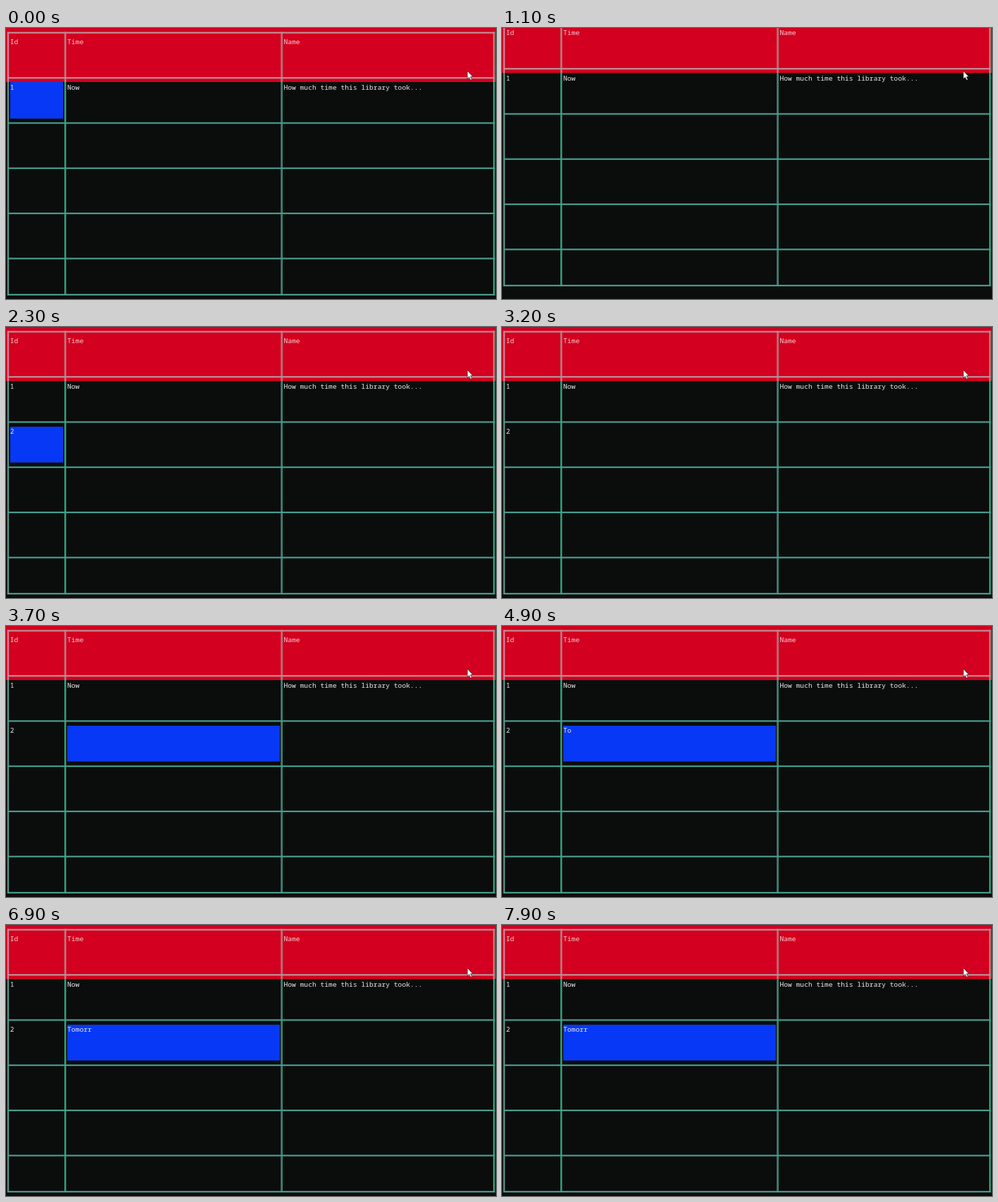
These frames come from a looping animation (696 px wide and 386 px high, 8 s). An HTML page:

```html
<!DOCTYPE html>
<html lang="en">
<head>
<meta charset="utf-8">
<title>Terminal table</title>
<style>
  html, body { margin: 0; width: 100%; height: 100%; overflow: hidden; background: #0b0d0c; }
  svg { display: block; }
  text { font: 500 9.667px "Noto Sans Mono", "DejaVu Sans Mono", monospace; white-space: pre; fill: #ececea; }
  .head { fill: #f8ccd4; }
</style>
</head>
<body>
<svg id="stage" width="696" height="386" viewBox="0 0 696 386">
  <g id="screen"></g>
  <path d="M655.3 61 V72.6 L657.9 70.2 L659.8 74.3 L661.6 73.5 L659.8 69.5 H663 Z"
        fill="#fff" stroke="#111" stroke-width=".6"/>
</svg>
<script>
// Terminal of 120 x 30 character cells.
const CW = 696 / 120, CH = 386 / 30, LOOP = 8000;
const ROWS = [0, 5, 10, 15, 20, 25, 29];
const screen = document.getElementById('screen');

function add(tag, attrs, content = '') {
  const el = document.createElementNS('http://www.w3.org/2000/svg', tag);
  for (const key in attrs) el.setAttribute(key, attrs[key]);
  el.textContent = content;
  return screen.appendChild(el);
}
const rect = (x, y, width, height, fill) => add('rect', { x, y, width, height, fill });
const label = (col, row, content, cls = '') =>
  add('text', { x: col * CW, y: row * CH + 10.3, class: cls }, content);

const px = col => Math.round(col * CW);
const py = row => Math.round(row * CH);
const midX = col => (col + .5) * CW + .1;
const midY = row => (row + .5) * CH + .3;
const headEnd = py(6);

rect(0, 0, 696, headEnd, '#d30020');
const mark = rect(0, 0, 0, 0, '#0738f6');

// Thin, slightly soft rules; the colour changes below the header.
function hRule(row) {
  const x = midX(0) - 1.1;
  rect(x, midY(row) - 1.1, midX(119) + 1.1 - x, 2.2, row < 6 ? '#c08c95' : '#489d8f');
}
function vRule(col, headColors, bodyColors) {
  const top = midY(0) - 1.1, end = midY(29) + 1.1;
  const pair = (y, h, colors) =>
    colors.forEach((c, i) => rect(midX(col) - 1.2 + i * 1.2, y, 1.2, h, c));
  pair(top, headEnd - top, headColors);
  pair(headEnd, end - headEnd, bodyColors);
}
vRule(0, ['#e673a6', '#c4808c'], ['#6b7fbe', '#5d8f78']);
vRule(14, ['#a28f88', '#b4968f'], ['#30b488', '#45a992']);
vRule(67, ['#b48e92', '#a8938c'], ['#5a9fa4', '#3fa78a']);
vRule(119, ['#bb8d8c', '#96998a'], ['#4ba58c', '#2cba90']);
ROWS.forEach(hRule);

label(1, 1, 'Id', 'head');
label(15, 1, 'Time', 'head');
label(68, 1, 'Name', 'head');
label(1, 6, '1');
label(15, 6, 'Now');
label(68, 6, 'How much time this library took...');
const id = label(1, 11, ''), time = label(15, 11, '');

// Selected cell as [column, row, width] in characters.
const MARKS = [
  [0, [1, 6, 13]], [1100, null], [1700, [1, 11, 13]], [3100, null], [3600, [15, 11, 52]]
];
const SCROLL = [[0, 0], [1100, 1], [1300, 0]];
const ID_KEYS = [[0, ''], [2200, '2']];
const TIME_KEYS = [0, 4000, 4600, 5200, 5700, 6100, 6600].map((t, n) => [t, 'Tomorr'.slice(0, n)]);
const at = (steps, t) => steps.filter(s => s[0] <= t).pop()[1];

function draw(now) {
  const t = now % LOOP, cell = at(MARKS, t);
  screen.setAttribute('transform', `translate(0 ${-py(at(SCROLL, t))})`);
  mark.setAttribute('visibility', cell ? 'visible' : 'hidden');
  if (cell) {
    const [col, row, width] = cell;
    mark.setAttribute('x', px(col));
    mark.setAttribute('y', py(row));
    mark.setAttribute('width', px(col + width) - px(col));
    mark.setAttribute('height', py(row + 4) - py(row));
  }
  id.textContent = at(ID_KEYS, t);
  time.textContent = at(TIME_KEYS, t);
}

let start;
function tick(now) {
  start ??= now;
  draw(now - start);
  requestAnimationFrame(tick);
}
draw(0);
requestAnimationFrame(tick);
</script>
</body>
</html>
```
